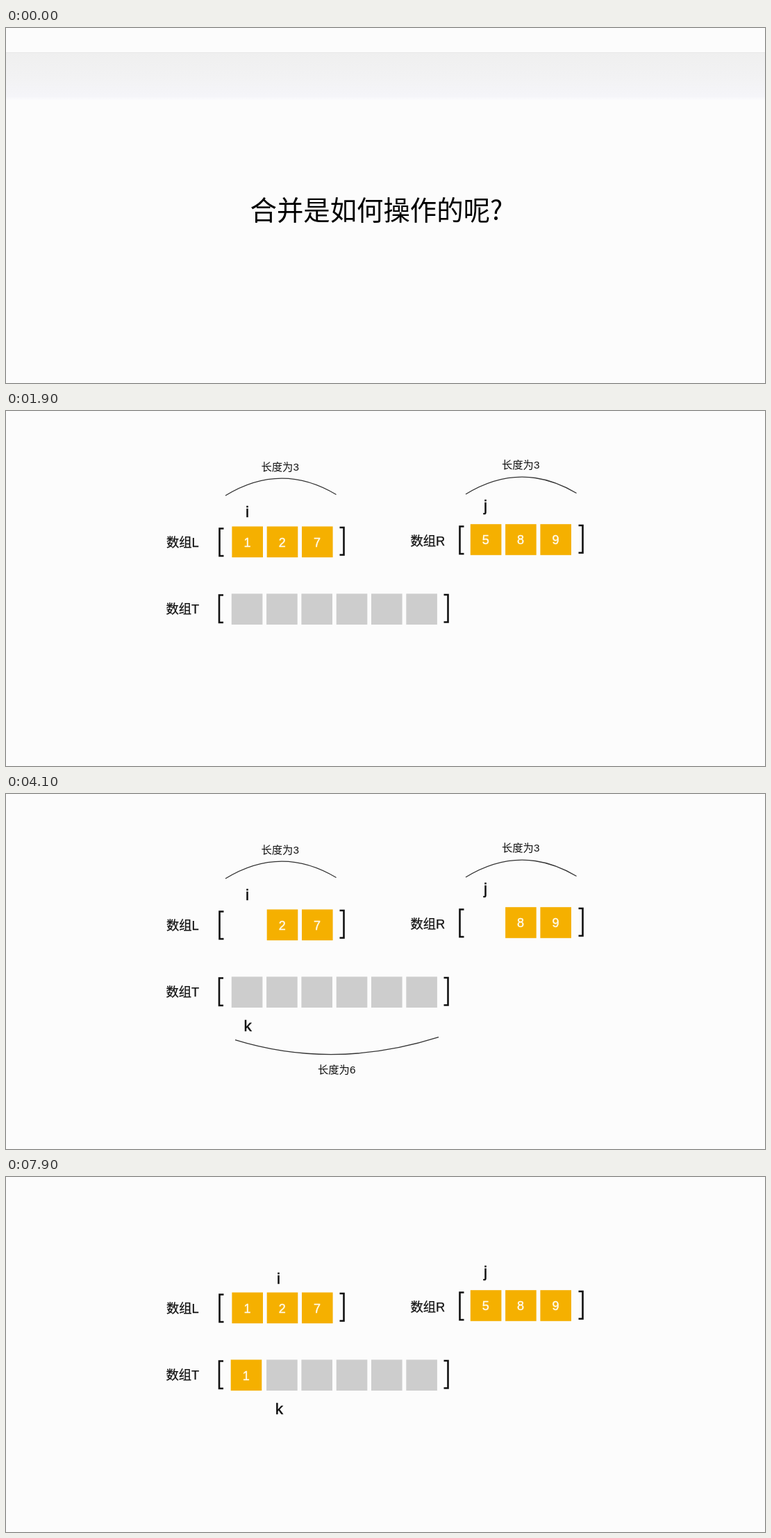
Write an HTML page that moves like this. It is 1093x512 px and loops after 8 s.

```html
<!DOCTYPE html>
<html lang="zh">
<head>
<meta charset="utf-8">
<style>
html, body { margin: 0; width: 100%; height: 100%; overflow: hidden; background: #fcfcfc; }
svg { display: block; width: 1093px; height: 512px; }
text { font-family: "Liberation Sans", "Noto Sans CJK SC", "Noto Sans CJK", sans-serif; fill: #111; }
.title { font-family: "Noto Sans CJK SC", "Noto Sans CJK", sans-serif; font-weight: 300; font-size: 38.4px; fill: #000; }
.name { font-size: 18.3px; stroke: #111; stroke-width: .25px; }
.note { font-size: 15.3px; }
.mark { font-size: 22.5px; text-anchor: middle; stroke: #111; stroke-width: .5px; }
.digit { font-size: 18px; text-anchor: middle; fill: #fffaea; stroke: #fffaea; stroke-width: .45px; }
.bracket { fill: none; stroke: #111; stroke-width: 2.6px; }
.arc { fill: none; stroke: #333; stroke-width: 1.3px; }
</style>
</head>
<body>
<svg id="stage" viewBox="0 0 1093 512">
  <defs>
    <linearGradient id="shade" x1="0" y1="0" x2="0" y2="1">
      <stop offset="0" stop-color="#efefef"/>
      <stop offset=".5" stop-color="#f2f2f3"/>
      <stop offset=".92" stop-color="#f5f5f9"/>
      <stop offset="1" stop-color="#fbfbfd"/>
    </linearGradient>
  </defs>
</svg>
<script>
const NS = "http://www.w3.org/2000/svg";
const stage = document.getElementById("stage");
const LOOP = 8000, STEP = 100, SIZE = 44.6;
const GOLD = "#f5b000", GREY = "#cdcdcd";

function add(parent, tag, attrs = {}, words) {
  const el = document.createElementNS(NS, tag);
  for (const key in attrs) el.setAttribute(key, attrs[key]);
  if (words !== undefined) el.textContent = words;
  parent.appendChild(el);
  return el;
}
const group = parent => add(parent, "g");
const label = (parent, cls, x, y, words) => add(parent, "text", { class: cls, x, y }, words);
const arc = (parent, d) => add(parent, "path", { class: "arc", d });

function cell(parent, x, y, fill, digit) {
  const g = group(parent);
  add(g, "rect", { x, y, width: SIZE, height: SIZE, fill });
  if (digit) label(g, "digit", x + 22, y + 29.2, digit);
  return g;
}

// dir is 1 for an opening bracket, -1 for a closing one
function bracket(parent, x, y, dir) {
  add(parent, "path", { class: "bracket", d: `M${x + 6 * dir} ${y}h${-6 * dir}v39.5h${6 * dir}` });
}

function row(parent, name, nameX, nameY, left, right, x, y, digits, fill) {
  label(parent, "name", nameX, nameY, name);
  bracket(parent, left[0], left[1], 1);
  bracket(parent, right[0], right[1], -1);
  return digits.map((d, i) => cell(parent, x + i * 50.3, y, fill, d));
}

// Opening title and toolbar shade
const band = group(stage);
add(band, "rect", { x: 0, y: 35, width: 1093, height: 69, fill: "url(#shade)" });
add(band, "rect", { x: 0, y: 35, width: 1093, height: 1, fill: "#e7e7e7" });
const title = label(stage, "title", 351.5, 277, "合并是如何操作的呢?");

// Arrays
const inputs = group(stage);
const leftCells = row(inputs, "数组L", 231, 196, [307.5, 169.5], [486.5, 168], 325.4, 166.5, [1, 2, 7], GOLD);
const rightCells = row(inputs, "数组R", 582.5, 194, [653.5, 166.5], [830.5, 165], 668.8, 163.2, [5, 8, 9], GOLD);
const iMark = label(inputs, "mark", 347.5, 152.5, "i");
label(inputs, "mark", 690.5, 143.5, "j");

const notes = group(inputs);
label(notes, "note", 367.5, 86.3, "长度为3");
label(notes, "note", 714, 83.3, "长度为3");
arc(notes, "M316 122Q396 73 475.5 120.5");
arc(notes, "M662 120Q742 71 821.5 118.5");

const output = group(stage);
const slots = row(output, "数组T", 230.5, 292, [307, 265.5], [636.5, 265], 324.8, 263.5, Array(6).fill(""), GREY);
const kMark = label(stage, "mark", 348, 342.3, "k");
const total = group(stage);
arc(total, "M330 354.7Q472 398.5 623 350.7");
label(total, "note", 449, 402.5, "长度为6");
const copy = cell(stage, 325.4, 166.5, GOLD, 1);

const ramp = (t, from, to) => Math.min(1, Math.max(0, (t - from) / (to - from)));
const ease = u => u * u * (3 - 2 * u);
const fade = (el, v) => el.setAttribute("opacity", v);
const shift = (el, x, y) => el.setAttribute("transform", `translate(${x} ${y})`);

function draw(t) {
  fade(band, 1 - ramp(t, 250, 600));
  fade(title, 1 - ramp(t, 450, 800));
  fade(inputs, ramp(t, 750, 1050));
  fade(output, ramp(t, 1400, 1700));

  fade(kMark, t >= 2100 ? 1 : 0);
  const leave = 1 - ramp(t, 6950, 7300);
  fade(total, ramp(t, 2030, 2255) * leave);
  fade(notes, leave);

  const blink = t >= 3900 && t < 4400;
  fade(leftCells[0], blink ? 0 : 1);
  fade(rightCells[0], blink ? 0 : 1);

  const drop = ease(ramp(t, 7250, 7700));
  fade(copy, drop > 0 ? 1 : 0);
  shift(copy, -1.7 * drop, 97 * drop);
  fade(slots[0], drop < 1 ? 1 : 0);

  const next = ease(ramp(t, 7718, 7945));
  shift(iMark, 50 * next, 1.5 * next);
  shift(kMark, 50.5 * next, 0);
}

// The picture advances ten times a second
function tick() {
  const t = performance.now() % LOOP;
  draw(Math.floor(t / STEP) * STEP);
  requestAnimationFrame(tick);
}
tick();
</script>
</body>
</html>
```
